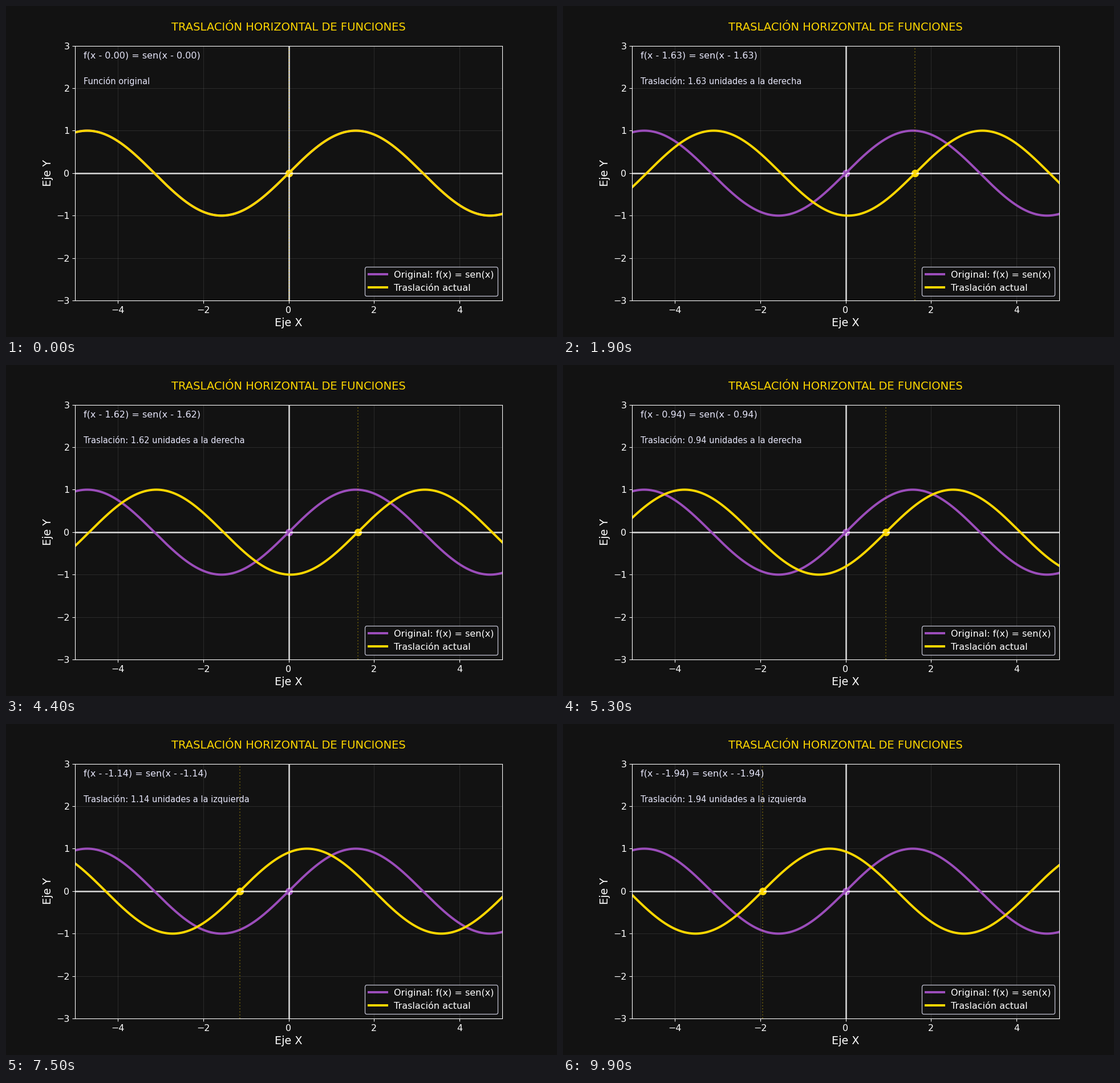
Animation, 966 px wide and 580 px high, one loop 10000 ms. Source, as a matplotlib script:

```python
import numpy as np
import matplotlib.pyplot as plt
from matplotlib.animation import FuncAnimation

DPI = 96
FRAMES, INTERVAL = 100, 100
BG, GOLD, PURPLE, PALE = "#121212", "#FFD700", "#9B4DBA", "#E6E6FA"

plt.rcParams.update({
    "font.family": "DejaVu Sans",
    "font.size": 12,
    "axes.titlesize": 14.6,
    "axes.labelsize": 14.4,
    "axes.facecolor": BG,
    "axes.edgecolor": "white",
    "axes.labelcolor": "white",
    "text.color": "white",
    "xtick.color": "white",
    "ytick.color": "white",
})

# the small excess keeps the pixel size from truncating down
fig, ax = plt.subplots(figsize=(966.01 / DPI, 580.01 / DPI), dpi=DPI, facecolor=BG)
fig.subplots_adjust(left=0.1251, right=0.9008)
ax.set(xlim=(-5, 5), ylim=(-3, 3), xlabel="Eje X", ylabel="Eje Y")
ax.set_xticks(range(-4, 5, 2))
ax.set_yticks(range(-3, 4))
ax.set_title("TRASLACIÓN HORIZONTAL DE FUNCIONES", color=GOLD, pad=20)
ax.grid(color="white", alpha=0.1, linewidth=0.8)
ax.axhline(0, color="white", lw=2, alpha=0.8)
ax.axvline(0, color="white", lw=2, alpha=0.8)

x = np.linspace(-5, 5, 1000)


def dot(color):
    # scatter sits below the axis lines and curves
    return ax.scatter([0], [0], s=80, color=color)


ax.plot(x, np.sin(x), color=PURPLE, lw=3, label="Original: f(x) = sen(x)")
curve, = ax.plot(x, np.sin(x), color=GOLD, lw=3, label="Traslación actual")
guide = ax.axvline(0, color=GOLD, ls=":", lw=1.5, alpha=0.3)
dot(PURPLE)
marker = dot(GOLD)

formula = ax.text(0.02, 0.95, "", transform=ax.transAxes, color=PALE)
note = ax.text(0.02, 0.85, "", transform=ax.transAxes, color=PALE, fontsize=11)
ax.legend(loc="lower right", facecolor=BG, edgecolor=PALE, framealpha=0.8)


def describe(h):
    if h == 0:
        return "Función original"
    side = "derecha" if h > 0 else "izquierda"
    return f"Traslación: {abs(h):.2f} unidades a la {side}"


def update(i):
    h = 2 * np.sin(0.05 * i)
    curve.set_ydata(np.sin(x - h))
    marker.set_offsets([[h, 0]])
    guide.set_xdata([h, h])
    formula.set_text(f"f(x - {h:.2f}) = sen(x - {h:.2f})")
    note.set_text(describe(h))
    return curve, marker, guide, formula, note


anim = FuncAnimation(fig, update, frames=FRAMES, init_func=lambda: update(0),
                     interval=INTERVAL, repeat=True, repeat_delay=0, blit=False)
plt.show()
```
